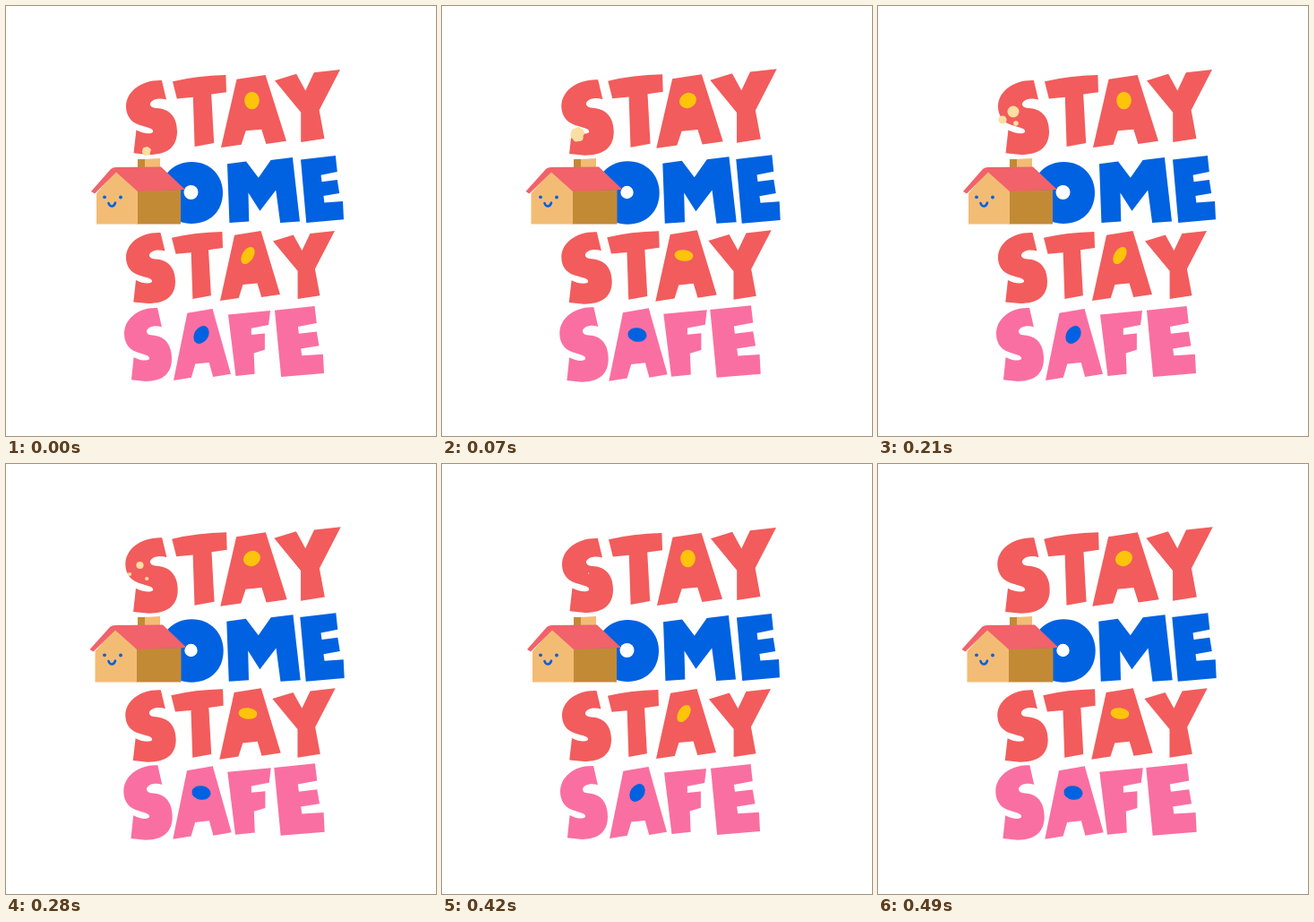
Recreate the animation shown at these times as an HTML page. Size 480 by 480 pixels, loop 560 ms.

```html
<!DOCTYPE html>
<html lang="en">
<head>
<meta charset="utf-8">
<title>Stay home, stay safe</title>
<style>
  html, body { margin: 0; width: 100%; height: 100%; overflow: hidden; background: #fff; }
  svg { display: block; width: 100vw; height: 100vh; }
</style>
</head>
<body>
<svg id="stage" viewBox="0 0 480 480" role="img" aria-label="Stay home, stay safe"></svg>
<script>
const STEP = 70, STEPS = 8, POSES = 3;
const RED = '#f25c5c', BLUE = '#0062e0', PINK = '#fa6fa1', YELLOW = '#fec40c';
const CREAM = '#fbdea2', LIGHT = '#f3bc75', DARK = '#c38a36', ROOF = '#f1626a';
const stage = document.getElementById('stage');

function add(parent, tag, attrs = {}) {
  const el = document.createElementNS('http://www.w3.org/2000/svg', tag);
  for (const key in attrs) el.setAttribute(key, attrs[key]);
  parent.append(el);
  return el;
}
const path = (parent, fill, d, attrs) => add(parent, 'path', { d, fill, ...attrs });
const oval = (parent, fill, x, y, rx, ry = rx, turn = 0) =>
  add(parent, 'ellipse', { cx: x, cy: y, rx, ry, fill, transform: `rotate(${turn} ${x} ${y})` });

// Cut-paper letter shapes in a 100 by 100 box.
const glyphs = {
  S: 'M70 0L79 26C66 23 49 25 47 32C49 39 60 36 73 39C92 43 100 55 100 69C100 90 80 100 45 100L15 98L20 67C33 72 51 73 53 69C53 64 43 64 26 60C8 56 0 46 0 35C0 16 28 -1 70 0Z',
  T: 'M0 9Q45 1 99 0L100 24L72 27L77 95L41 100L38 31L8 33Z',
  A: 'M24 6L68 0L100 91L69 95L62 75L38 77L31 96L0 100Z',
  Y: 'M0 15L33 6L47 29L60 4L100 0L68 56L76 95L40 100L40 59Z',
  O: 'M50 0C81 0 100 23 100 50C100 80 79 100 50 100C22 100 0 78 0 50C0 22 22 0 50 0Z',
  M: 'M0 10L26 6L43 31L60 4L90 0L100 98L73 100L67 50L45 82L29 54L30 98L3 100Z',
  E: 'M0 6L81 0L85 24L47 29L49 39L85 36L90 56L53 60L55 70L98 68L100 95L13 100Z',
  F: 'M0 6L100 0L96 22L55 27L55 37L87 35L87 60L61 65L63 97L18 100Z',
};

// Each word: colour, letters, then one box (left, top, right, bottom) per letter.
const words = [
  [RED, 'STAY', [134, 83, 191, 166], [186, 77, 246, 157], [240, 77, 313, 158], [300, 71, 373, 152]],
  [BLUE, 'OME', [172, 174, 242, 243], [247, 169, 328, 242], [329, 167, 377, 242]],
  [RED, 'STAY', [134, 253, 189, 332], [185, 252, 242, 327], [239, 251, 306, 329], [298, 251, 367, 327]],
  [PINK, 'SAFE', [132, 337, 185, 419], [187, 338, 251, 418], [248, 340, 295, 413], [300, 335, 355, 414]],
];

function drawLetter(g, color, letter, [left, top, right, bottom], grow) {
  const sx = (right - left + 2 * grow) / 100, sy = (bottom - top + 2 * grow) / 100;
  path(g, color, glyphs[letter], { transform: `translate(${left - grow} ${top - grow}) scale(${sx} ${sy})` });
}

function drawHouse(g, pose) {
  const left = 101 - 1.5 * pose, right = 195 + pose / 2;
  const peak = 123 - pose, corner = 147 - pose * pose;
  path(g, DARK, `M${corner - 1} 206L${right} 205V243.5H${corner - 1}Z`);
  path(g, LIGHT, `M${left} 243.5V209L${peak} 184L${corner} 206V243.5Z`);
  path(g, DARK, 'M147 171H156V181H147Z');
  path(g, LIGHT, 'M155 171L172 170V181H155Z');
  path(g, ROOF, `M${left - 6} 207L${peak - 6} 182Q${peak - 4} 180 ${peak} 180L${173 + 2 * pose} 179.5
    L${200 + 1.5 * pose} 205L${corner} 207L${peak} 185.5L${left - 2} 209.5Z`);
  oval(g, BLUE, 110, 213.3, 1.9);
  oval(g, BLUE, 128, 213.5, 1.9);
  path(g, 'none', 'M114.5 220Q115.5 223.5 118.3 223.5Q121 223.5 122 219.7',
    { stroke: BLUE, 'stroke-width': 2.6, 'stroke-linecap': 'round' });
}

// Poses swell a little from one to the next, and the spots tumble.
function drawPose(_, pose) {
  const g = add(stage, 'g');
  for (const [color, text, ...boxes] of words)
    boxes.forEach((box, i) => drawLetter(g, color, text[i], box, pose * 0.7));
  const turn = pose * 64;
  oval(g, '#fff', 206.5, 208, 8 - 0.8 * pose * pose);
  oval(g, YELLOW, 274.5, 105.5, 8.3, 9.8, turn);
  oval(g, YELLOW, 270, 278.5, 6.3, 10.5, 32 + turn);
  oval(g, BLUE, 218, 367, 7.8, 10.6, 33 + turn);
  drawHouse(g, pose);
  return g;
}

// Crumbs of the burst puff: start, drift per step, radius, shrink per step.
const crumbs = [
  { x: 151, y: 118, dx: -1.5, dy: -5, r: 6.5, shrink: 2.4 },
  { x: 139, y: 127, dx: -1, dy: -4, r: 4.6, shrink: 2.5 },
  { x: 154, y: 131, dx: 3.2, dy: -3, r: 2.8, shrink: 0.7 },
];

// A puff swells as it rises from the chimney, then bursts.
function drawPuff(_, step) {
  const g = add(stage, 'g');
  if (step < 3) {
    const x = 157 - 5.5 * step, y = 162 - 18.5 * step, r = 5 + 3 * step;
    for (let angle = 1; angle < 6; angle += 0.95)
      oval(g, CREAM, x + r * 0.5 * Math.cos(angle), y + r * 0.5 * Math.sin(angle), r * 0.52);
    return g;
  }
  const age = step - 3;
  for (const { x, y, dx, dy, r, shrink } of crumbs) {
    const radius = r - shrink * age;
    if (radius > 0.2) oval(g, CREAM, x + dx * age, y + dy * age, radius);
  }
  return g;
}

const poseLayers = Array.from({ length: POSES }, drawPose);
const puffLayers = Array.from({ length: STEPS }, drawPuff);
const showOnly = (layers, index) =>
  layers.forEach((layer, i) => layer.setAttribute('display', i === index ? 'inline' : 'none'));

function render() {
  const step = Math.floor(performance.now() / STEP) % STEPS;
  showOnly(poseLayers, step % POSES);
  showOnly(puffLayers, step);
  requestAnimationFrame(render);
}
render();
</script>
</body>
</html>
```
